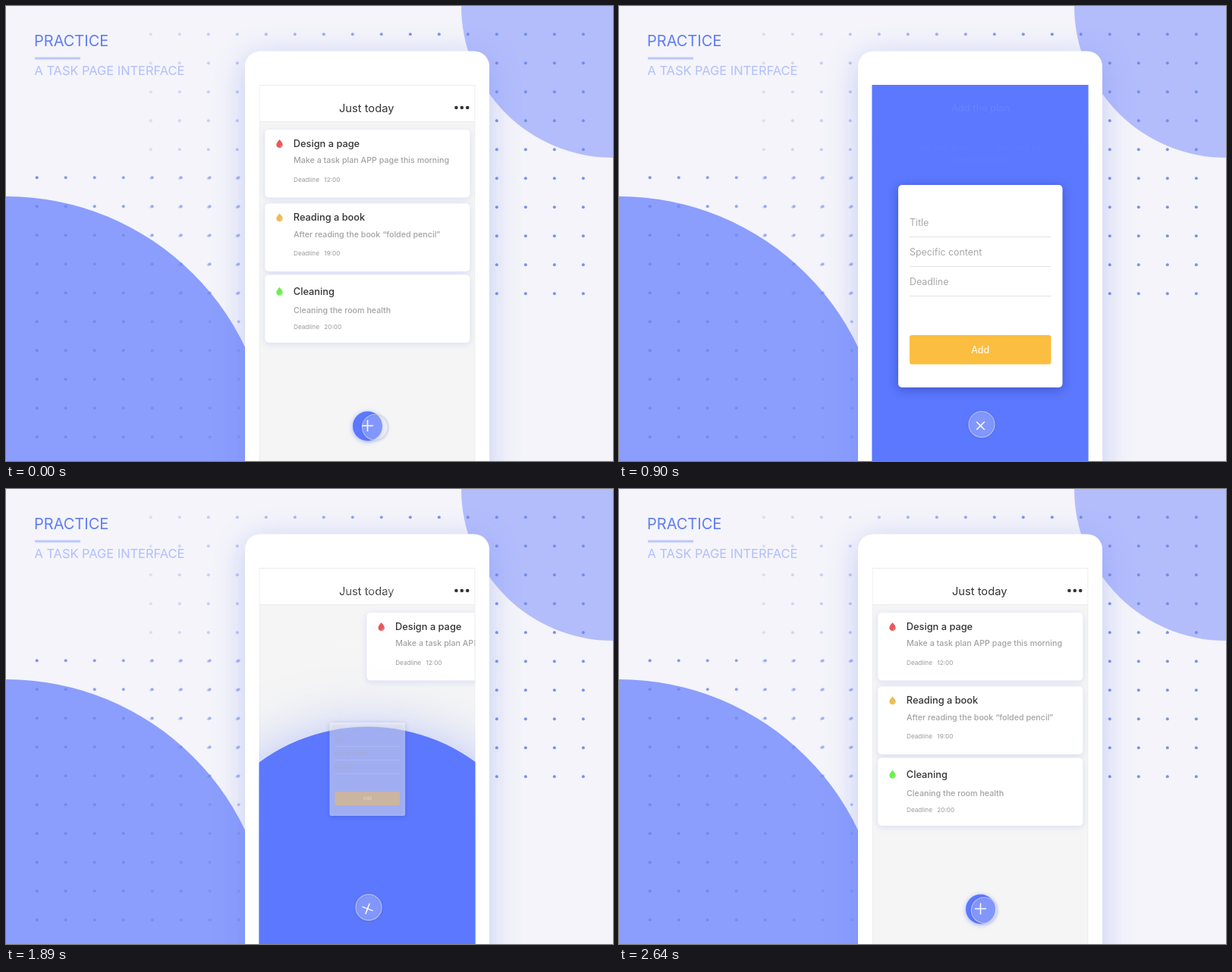
Recreate the animation shown at these times as an HTML page with a canvas. Size 800x600 px, loop 2670 ms.

```html
<!DOCTYPE html>
<html lang="en">
<head>
<meta charset="utf-8">
<title>Task page</title>
<style>
html, body { margin: 0; width: 100%; height: 100%; overflow: hidden; background: #f4f4fa; }
canvas { display: block; width: 800px; height: 600px; }
</style>
</head>
<body>
<canvas id="stage" width="800" height="600"></canvas>
<script>
const ctx = document.getElementById('stage').getContext('2d');
const LOOP = 2670;
const MOVE = 283;
const OPEN = 368;
const CLOSE = 1741;
const BLUE = '#5b78ff';
const SCREEN = { x: 334, y: 104, w: 284.5, h: 496 };

const CARDS = [
  { y: 163, title: 'Design a page', titleY: 186, text: 'Make a task plan APP page this morning', textY: 207,
    time: '12:00', timeY: 231.5, color: '#e8585c', far: 285 },
  { y: 260.5, title: 'Reading a book', titleY: 283.4, text: 'After reading the book “folded pencil”', textY: 304.5,
    time: '19:00', timeY: 328.8, color: '#ebbd55', far: 321 },
  { y: 354.5, title: 'Cleaning', titleY: 380.8, text: 'Cleaning the room health', textY: 405,
    time: '20:00', timeY: 426, color: '#6cf04e', far: 358 }
];

// Smooth 0..1 progress of t from start over a duration
function ease(t, start, duration = MOVE) {
  const u = Math.min(1, Math.max(0, (t - start) / duration));
  return u * u * (3 - 2 * u);
}

function circle(x, y, r, fill) {
  ctx.fillStyle = fill;
  ctx.beginPath();
  ctx.arc(x, y, r, 0, Math.PI * 2);
  ctx.fill();
}

function box(x, y, w, h, r, fill) {
  ctx.fillStyle = fill;
  ctx.beginPath();
  ctx.roundRect(x, y, w, h, r);
  ctx.fill();
}

function label(str, x, y, size, fill, weight = 400, align = 'left') {
  ctx.font = `${weight} ${size}px Inter, "Noto Sans", sans-serif`;
  ctx.textAlign = align;
  ctx.fillStyle = fill;
  ctx.fillText(str, x, y);
}

function withShadow(color, blur, dy, draw) {
  ctx.save();
  ctx.shadowColor = color;
  ctx.shadowBlur = blur;
  ctx.shadowOffsetY = dy;
  draw();
  ctx.restore();
}

function dotGrid(x0, y0, cols, rows, alphaAt) {
  for (let c = 0; c < cols; c++) {
    for (let r = 0; r < rows; r++) {
      circle(x0 + c * 38, y0 + r * 38, 2, `rgba(108,135,232,${alphaAt(c)})`);
    }
  }
}

function drawBackdrop() {
  ctx.fillStyle = '#f4f4fa';
  ctx.fillRect(0, 0, 800, 600);
  circle(800, 0, 200, '#b3bdfc');
  circle(0, 600, 349, '#8b9efd');
  dotGrid(40.7, 226.2, 8, 10, c => 0.9 - c * 0.06);
  dotGrid(190.8, 37.3, 16, 10, c => Math.min(0.9, 0.2 + c * 0.075));
  label('PRACTICE', 37, 53, 20, '#5f7df4');
  ctx.fillStyle = '#bcc8fc';
  ctx.fillRect(38, 67.5, 60, 3);
  label('A TASK PAGE INTERFACE', 37.5, 91, 16.4, '#b1bffb');
  withShadow('rgba(100,125,240,0.33)', 40, 8, () => box(315, 59.5, 322, 620, [20, 20, 0, 0], '#fff'));
}

function drawDrop(x, y, color) {
  ctx.fillStyle = color;
  ctx.beginPath();
  ctx.moveTo(x, y - 5.5);
  ctx.bezierCurveTo(x + 2, y - 3, x + 4.2, y - 1, x + 4.2, y + 1.4);
  ctx.bezierCurveTo(x + 4.2, y + 6.8, x - 4.2, y + 6.8, x - 4.2, y + 1.4);
  ctx.bezierCurveTo(x - 4.2, y - 1, x - 2, y - 3, x, y - 5.5);
  ctx.fill();
  ctx.strokeStyle = 'rgba(255,255,255,0.4)';
  ctx.lineWidth = 0.8;
  ctx.beginPath();
  ctx.arc(x, y + 1.4, 2.6, 0.2, 1.4);
  ctx.stroke();
}

function drawCard(card, shift) {
  const x = 341.3 + shift;
  if (x > 640) return;
  withShadow('rgba(120,140,235,0.22)', 9, 2, () => box(x, card.y, 270, 89.5, 5, '#fff'));
  drawDrop(x + 19.2, card.titleY - 4.5, card.color);
  label(card.title, x + 37.5, card.titleY, 12.8, '#333', 500);
  label(card.text, x + 37.7, card.textY, 10.7, '#a2a2a2', 500);
  label('Deadline', x + 37.7, card.timeY, 8.2, '#999');
  label(card.time, x + 78, card.timeY, 8.2, '#999');
}

function drawTasks(t) {
  const { x, y, w, h } = SCREEN;
  ctx.fillStyle = '#f5f5f5';
  ctx.fillRect(x, y, w, h);
  CARDS.forEach((card, i) => {
    const away = t < 1200 ? ease(t, OPEN) : 1 - ease(t, CLOSE + 2 + i * 99);
    drawCard(card, away * card.far);
  });
  ctx.fillStyle = '#fff';
  ctx.fillRect(x, y, w, 48);
  ctx.fillStyle = '#ececee';
  ctx.fillRect(x, 152, w, 1);
  label('Just today', 475.2, 139.6, 14.7, '#333', 400, 'center');
  for (let i = 0; i < 3; i++) circle(593.4 + i * 7.4, 134, 2.3, '#333');
  ctx.strokeStyle = '#ebebee';
  ctx.lineWidth = 1;
  ctx.strokeRect(x, y + 0.5, w - 0.5, h + 10);
}

function drawPlanText(alpha) {
  ctx.save();
  ctx.globalAlpha = alpha;
  label('Add the plan', 476.5, 139, 12.8, '#fff', 400, 'center');
  ctx.globalAlpha = alpha * 0.42;
  label('We only plan today, and must be', 476.2, 190.8, 10.5, '#fff', 400, 'center');
  label('completed today.', 476.2, 206.6, 10.5, '#fff', 400, 'center');
  ctx.restore();
}

function drawForm(scale, alpha) {
  if (scale < 0.01 || alpha <= 0) return;
  ctx.save();
  ctx.globalAlpha = alpha;
  ctx.translate(476.25, 369.5);
  ctx.scale(scale, scale);
  ctx.translate(-476.25, -369.5);
  withShadow('rgba(20,30,110,0.38)', 14 * scale, 3 * scale, () => box(368, 236, 216.5, 267, 5, '#fff'));
  ['Title', 'Specific content', 'Deadline'].forEach((name, i) => {
    label(name, 383, 290 + i * 38.9, 12.4, '#a8a8a8');
    ctx.fillStyle = '#e2e2e4';
    ctx.fillRect(383, 304 + i * 39, 186.5, 1);
  });
  box(383, 434, 186.5, 38.5, 3, '#fbbe40');
  label('Add', 476.2, 458, 12.6, '#fff', 400, 'center');
  ctx.restore();
}

function drawTouch(t) {
  const arrive = 1 - ease(t, 0, 260);
  const leave = ease(t, 2350, 290);
  const x = 478 + arrive * 8.5 + leave * 3.3;
  const y = 551.7 + Math.max(arrive, leave) * 3.8;
  withShadow('rgba(40,50,120,0.35)', 3, 0.5, () => {
    ctx.strokeStyle = 'rgba(205,208,228,0.75)';
    ctx.lineWidth = 1.2;
    ctx.beginPath();
    ctx.arc(x, y, 17, 0, Math.PI * 2);
    ctx.stroke();
  });
  circle(x, y, 16.8, 'rgba(238,238,245,0.26)');
}

function drawPlus(turn) {
  ctx.save();
  ctx.translate(476.5, 553.5);
  ctx.rotate(turn * Math.PI / 4);
  ctx.strokeStyle = '#fff';
  ctx.lineWidth = 1.5;
  ctx.beginPath();
  ctx.moveTo(-7.5, 0);
  ctx.lineTo(7.5, 0);
  ctx.moveTo(0, -7.5);
  ctx.lineTo(0, 7.5);
  ctx.stroke();
  ctx.restore();
}

function draw(t) {
  const closing = ease(t, CLOSE);
  const open = ease(t, OPEN) - closing;
  const radius = 19.5 + open * 480;

  drawBackdrop();
  ctx.save();
  ctx.beginPath();
  ctx.rect(SCREEN.x - 0.5, SCREEN.y, SCREEN.w + 0.5, SCREEN.h);
  ctx.clip();
  drawTasks(t);
  withShadow('rgba(91,120,255,0.55)', radius * 0.34, radius * 0.06,
    () => circle(476.5, 554, radius, BLUE));
  drawPlanText(ease(t, 850) - closing);
  drawForm(ease(t, 521) - closing, ease(t, 521, 150) - closing);
  drawTouch(t);
  drawPlus(open);
  ctx.restore();
}

let start;
function tick(now) {
  start ??= now;
  draw((now - start) % LOOP);
  requestAnimationFrame(tick);
}
draw(0);
requestAnimationFrame(tick);
</script>
</body>
</html>
```
